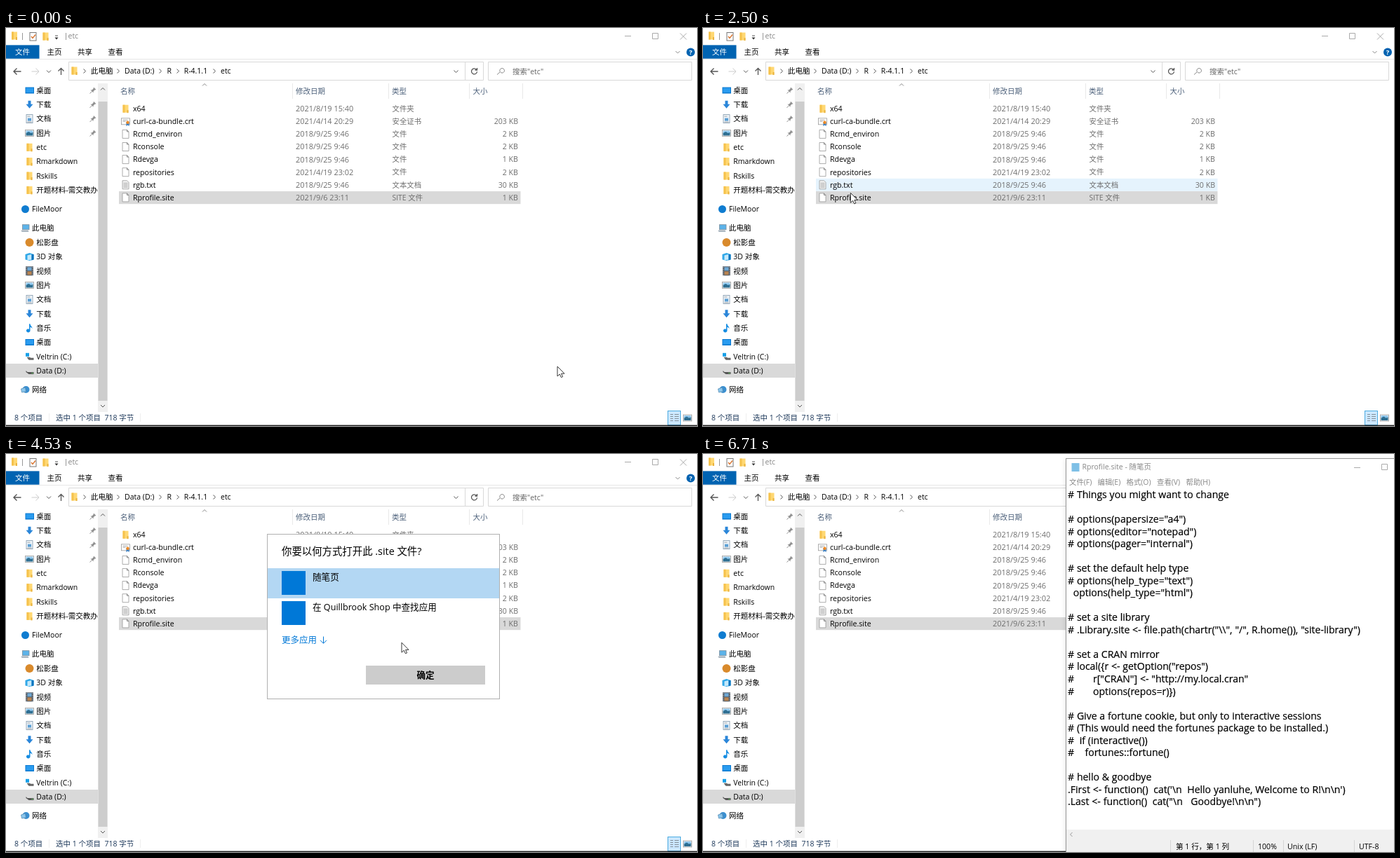
These frames come from a looping animation (985x568 px, 6.74 s). An HTML page:

```html
<!DOCTYPE html>
<html lang="zh-CN">
<head>
<meta charset="utf-8">
<title>Rprofile.site</title>
<style>
  html, body { margin: 0; width: 100%; height: 100%; overflow: hidden; background: #fff; }
  svg { display: block; width: 985px; height: 568px; }
  text { font-family: "Open Sans", "Noto Sans CJK SC", "Noto Sans CJK", sans-serif; white-space: pre; }
  .line { fill: none; stroke: #555; }
  .faint { stroke: #aaa; }
  .script { stroke: #000; stroke-width: .2px; word-spacing: .2px; }
  #explorer.active .faint { stroke: #000; }
  #explorer.active #title { fill: #000; }
  #explorer.active #selected { fill: #cce8ff; }
  #notepad.inactive .chrome { fill: #888; }
  #notepad.inactive .buttons { stroke: #aaa; }
</style>
</head>
<body>
<svg id="stage" viewBox="0 0 985 568"></svg>
<script>
const LOOP = 6740;

// Drawing helpers
const escapeText = s => s.replace(/&/g, '&amp;').replace(/</g, '&lt;');
const text = (x, cy, s, size = 10.5, fill = '#000', extra = '') =>
  `<text x="${x}" y="${cy + size * .36}" font-size="${size}" fill="${fill}" ${extra}>${escapeText(s)}</text>`;
const rect = (x, y, w, h, fill, extra = '') =>
  `<rect x="${x}" y="${y}" width="${w}" height="${h}" fill="${fill}" ${extra}/>`;
const line = (d, extra = '') => `<path class="line" d="${d}" ${extra}/>`;
const shape = (d, fill, extra = '') => `<path d="${d}" fill="${fill}" ${extra}/>`;
const at = (x, y, body) => `<g transform="translate(${x} ${y})">${body}</g>`;
const circle = (r, fill) => `<circle r="${r}" fill="${fill}"/>`;
const chevron = (x, y, dir, stroke = '#555') =>
  line({ right: `M${x - 1.5} ${y - 3}l3 3-3 3`, left: `M${x + 1.5} ${y - 3}l-3 3 3 3`,
         down: `M${x - 3} ${y - 1.5}l3 3 3-3`, up: `M${x - 3} ${y + 1.5}l3-3 3 3` }[dir],
       `style="stroke:${stroke}"`);

const icons = {
  folder: rect(-4, -5.5, 8, 11, '#ffd873') + rect(-4, -5.5, 3, 11, '#f5c24d') + rect(2, 2, 2, 4, '#e9b340'),
  page: shape('M-4.5-6H2L4.5-3.5V6H-4.5z', '#fff', 'stroke="#999" stroke-width=".8"') + line('M2-6v2.5h2.5', 'stroke-width=".7"'),
  lines: shape('M-4.5-6H2L4.5-3.5V6H-4.5z', '#f4f4f4', 'stroke="#999" stroke-width=".8"') +
    line('M-3-2.5h6M-3-.5h6M-3 1.5h6M-3 3.5h6', 'stroke-width=".8" opacity=".6"'),
  cert: rect(-6, -4.5, 12, 9, '#fff', 'stroke="#999" stroke-width=".8"') + line('M-4-2h7M-4 0h4', 'opacity=".5"') +
    shape('M1 1h4v6l-2-2-2 2z', '#2f79c2') + at(3, 1.5, circle(2.2, '#ee8a25')),
  desktop: rect(-6, -4.5, 12.5, 9, '#0a78d0') + rect(-5, -3.5, 10.5, 6.5, '#2a9cf0'),
  down: shape('M-2-5.5H2V-.5H5L0 5.5-5-.5H-2z', '#2b86d9'),
  doc: rect(-4.5, -6, 9, 12, '#eef4f9', 'stroke="#8197aa" stroke-width=".8"') + rect(-2.5, -1, 5, 4, '#5a9fd4') +
    line('M-3-3.5h4M-3 4.5h6', 'opacity=".5"'),
  picture: rect(-6, -4.5, 12, 9, '#fff', 'stroke="#999" stroke-width=".8"') + rect(-5, -3.5, 10, 4, '#8fc7ee') +
    shape('M-5 3.5V0l4-2 3 2 3-1v4.5z', '#2d6e91'),
  cube: shape('M-6-3.5L0-5.5 6-3.5V4L0 5.5-6 4z', '#31a8e8') + shape('M-3-2L3-3.5V4L-3 5z', '#c5e9fb') + shape('M3-3.5l3 0V4L3 5z', '#0a73bd'),
  video: rect(-5.5, -6.5, 11, 13, '#4b5560') + rect(-3, -5.5, 6, 5, '#6fa8d4') + rect(-3, .5, 6, 5, '#b98450') +
    line('M-4.5-5.5v12M4.5-5.5v12', 'style="stroke:#ddd" stroke-dasharray="1.3 1.3"'),
  music: shape('M-.5-6H1C1-3 4-3 4 1 3-1 2-1 1-1.5V3.5a2.8 2.5 0 1 1-1.5-2z', '#168de2'),
  disk: shape('M-5 0H4L6 2H-3z', '#ddd') + shape('M-5 0L-3 2H6V5H-1L-5 2z', '#555') + rect(3, 3, 2, 1, '#69dd69'),
  system: rect(-5.5, -5, 5, 5, '#18a0e8') + shape('M-4 1H0L2 2H6V5H-1z', '#666'),
  pc: rect(-4, -5, 9.5, 7, '#5cb3ea', 'stroke="#7b8b98" stroke-width=".8"') + shape('M-6 3H4L5 5H-5z', '#9aa8b4'),
  network: at(1, 0, circle(5, '#3b8fd0')) + shape('M-6-1L0-3 1 3-5 4z', '#8bc6ec', 'stroke="#4d84ad" stroke-width=".7"'),
  drop: circle(5.5, '#0f7cd0'),
  nut: circle(6, '#d98a2c'),
  pin: shape('M1-4.5L4.5-1 2.5-.5.5 1.5.5 3.5-3.5-.5-1.5-.5.5-2.5z', '#909090') + line('M-1.5 1.5L-4.5 4.5', 'style="stroke:#909090"')
};
const icon = (name, x, y) => at(x, y, icons[name]);

// File manager content
const navItems = [
  [89, 'desktop', '桌面'], [109.3, 'down', '下载'], [129.6, 'doc', '文档'], [150, 'picture', '图片'],
  [170.3, 'folder', 'etc'], [190.6, 'folder', 'Rmarkdown'], [211, 'folder', 'Rskills'], [231.4, 'folder', '开题材料-需交教办'],
  [258.5, 'drop', 'FileMoor', 1], [285.7, 'pc', '此电脑', 1], [306, 'nut', '松影盘'], [326.4, 'cube', '3D 对象'],
  [346.8, 'video', '视频'], [367, 'picture', '图片'], [387.4, 'doc', '文档'], [407.8, 'down', '下载'],
  [428.2, 'music', '音乐'], [448.5, 'desktop', '桌面'], [468.8, 'system', 'Veltrin (C:)'], [489, 'disk', 'Data (D:)'],
  [516, 'network', '网络', 1]
];
const files = [
  ['folder', 'x64', '2021/8/19 15:40', '文件夹', ''],
  ['cert', 'curl-ca-bundle.crt', '2021/4/14 20:29', '安全证书', '203 KB'],
  ['page', 'Rcmd_environ', '2018/9/25 9:46', '文件', '2 KB'],
  ['page', 'Rconsole', '2018/9/25 9:46', '文件', '2 KB'],
  ['page', 'Rdevga', '2018/9/25 9:46', '文件', '1 KB'],
  ['page', 'repositories', '2021/4/19 23:02', '文件', '2 KB'],
  ['lines', 'rgb.txt', '2018/9/25 9:46', '文本文档', '30 KB'],
  ['page', 'Rprofile.site', '2021/9/6 23:11', 'SITE 文件', '1 KB']
];
const rowY = i => 115.2 + 18.1 * i;

function titleBar() {
  return icon('folder', 12, 11) + line('M23.5 7v10M85.5 7v10', 'opacity=".6"') +
    rect(34, 6.5, 9, 11.5, '#fff', 'stroke="#777"') + line('M36 12l2 2.5 4-5', 'style="stroke:#d8722c" stroke-width="1.4"') +
    icon('folder', 56.5, 12) + shape('M69.5 13.5h5l-2.5 3z', '#333') + line('M70 11h4') +
    text(88.5, 11.5, 'etc', 10.5, '#888', 'id="title"') +
    `<path class="line faint" d="M882 11.5h9M921.5 7.5h8v8h-8zM961 7.5l9 9M970 7.5l-9 9"/>` +
    rect(0, 24.4, 47.5, 19.3, '#0063b1') + text(13, 34, '文件', 10.5, '#fff') +
    text(58.5, 34.3, '主页') + text(102, 34.3, '共享') + text(145.5, 34.3, '查看') +
    chevron(957.5, 34.5, 'down', '#888') + at(976, 34.5, circle(6, '#0063b1')) +
    text(976, 34.5, '?', 9.5, '#fff', 'text-anchor="middle" font-weight="700"') +
    line('M0 44.5H985', 'style="stroke:#e6e6e6"');
}
function addressBar() {
  const crumbs = [[121, '此电脑'], [169, 'Data (D:)'], [229.5, 'R'], [253.7, 'R-4.1.1'], [306, 'etc']];
  return line('M21.5 62H11.5M15.5 57.5L11 62l4.5 4.5', 'stroke-width="1.4"') +
    line('M36.5 62h10M42.5 57.5L47 62l-4.5 4.5', 'style="stroke:#ccc"') + chevron(61, 62, 'down') +
    line('M78.5 67V57.5M74.5 61.5l4-4 4 4', 'stroke-width="1.3"') +
    line('M89.5 48.5H680.5V74.5H89.5zM654.5 49v25M687.5 48.5H977.5V74.5H687.5z', 'style="stroke:#d9d9d9"') +
    icon('folder', 97.5, 61) + [112, 160, 220, 245, 297].map(x => chevron(x, 61.5, 'right')).join('') +
    crumbs.map(([x, s]) => text(x, 61.5, s)).join('') + chevron(641.5, 62, 'down') +
    line('M670.5 59.2a4 4 0 1 0 1 3M671.5 57v3h-3', 'stroke-width="1.3"') +
    line('M704 63L700 66.5M707.2 57.5a3.3 3.3 0 1 1-.1 0z', 'style="stroke:#888"') + text(722, 61.8, '搜索"etc"', 10.5, '#666');
}
function fileList() {
  const heads = [[163, '名称'], [413, '修改日期'], [550, '类型'], [665.5, '大小']];
  const grey = '#6d6d6d';
  return `<g id="headHover">${rect(149, 79, 259, 22, '#d9ebf9')}${line('M394.5 79v22', 'style="stroke:#b9d9f0"')}${chevron(400.5, 90, 'down')}</g>` +
    line('M408.5 79v22M545.5 79v22M660.5 79v22M736.5 79v22', 'style="stroke:#e9e9e9"') +
    chevron(283, 81, 'up', '#888') + heads.map(([x, s]) => text(x, 90.3, s, 10.5, '#4c607a')).join('') +
    rect(161, 0, 572.5, 18, '#e5f3fd', 'id="rowHover"') + rect(161, 233, 572.5, 18.2, '#d9d9d9', 'id="selected"') +
    files.map(([kind, name, date, type, size], i) => {
      const y = rowY(i);
      return icon(kind, 170.5, y) + text(181, y, name, 10.6) + text(413, y, date, 10.9, grey) +
        text(550.5, y, type, 10.4, grey) + text(730, y, size, 10.6, grey, 'text-anchor="end"');
    }).join('');
}
function navPane() {
  return rect(0, 0, 131, 20, '#e5f3ff', 'id="navHover"') + rect(0, 479, 131, 20, '#d9d9d9') +
    `<clipPath id="navClip"><rect x="0" y="78" width="130.5" height="470"/></clipPath><g clip-path="url(#navClip)">` +
    navItems.map(([y, kind, name, root]) => icon(kind, root ? 27.5 : 33.5, y) + text(root ? 37 : 43.3, y, name)).join('') + '</g>' +
    [0, 1, 2, 3].map(i => icon('pin', 124, navItems[i][0])).join('') +
    rect(131, 79, 14, 469, '#f0f0f0') + rect(131.5, 105, 13, 427, '#cdcdcd') +
    chevron(138, 87, 'up') + chevron(138, 539.5, 'down');
}
function statusBar() {
  const ink = '#1e395b';
  return text(12, 556.3, '8 个项目', 10.5, ink) + text(71, 556.3, '选中 1 个项目  718 字节', 10.5, ink) +
    line('M61.5 550v12M191.5 550v12', 'style="stroke:#eee"') +
    rect(943.5, 546.5, 18, 20, '#cce8ff', 'stroke="#4cabe0"') +
    line('M947 551.5h4M947 554.5h4M947 557.5h4M947 560.5h4M953 551.5h6M953 554.5h6M953 557.5h6M953 560.5h6', 'opacity=".6"') +
    icon('picture', 971.5, 556.5) + rect(0, 566.6, 985, 1.4, '#222');
}
function dialogBox() {
  return rect(372.5, 114.5, 331, 235, '#fff', 'stroke="#b0b0b0"') +
    text(393, 139.3, '你要以何方式打开此 .site 文件?', 14.4) +
    rect(373, 163, 330, 43, '#dedede', 'id="firstItem"') + rect(373, 206, 330, 43, '#dedede', 'id="secondItem"') +
    rect(393, 167, 34, 34, '#0078d7') + text(437, 175.5, '随笔页', 12.6) +
    rect(393, 210, 34, 34, '#0078d7') + text(437, 218.5, '在 Quillbrook Shop 中查找应用', 12.6) +
    text(393, 265.5, '更多应用', 12.5, '#0078d7') +
    line('M452.5 260.5v9.5M448 265.8l4.5 4.5 4.5-4.5', 'style="stroke:#0078d7"') +
    rect(513, 302, 170, 27, '#e8e8e8', 'id="okButton"') +
    text(598, 315.8, '确定', 12.6, '#8a8a8a', 'id="okLabel" text-anchor="middle" font-weight="600"');
}
const script = String.raw`# Things you might want to change

# options(papersize="a4")
# options(editor="notepad")
# options(pager="internal")

# set the default help type
# options(help_type="text")
  options(help_type="html")

# set a site library
# .Library.site <- file.path(chartr("\\", "/", R.home()), "site-library")

# set a CRAN mirror
# local({r <- getOption("repos")
#       r["CRAN"] <- "http://my.local.cran"
#       options(repos=r)})

# Give a fortune cookie, but only to interactive sessions
# (This would need the fortunes package to be installed.)
#  if (interactive())
#    fortunes::fortune()

# hello & goodbye
.First <- function()  cat('\n  Hello yanluhe, Welcome to R!\n\n')
.Last <- function()  cat("\n   Goodbye!\n\n")`;

function notepadWindow() {
  const menu = [[522, '文件(F)'], [562.5, '编辑(E)'], [603.5, '格式(O)'], [647, '查看(V)'], [688.5, '帮助(H)']];
  const status = [[674, '第 1 行，第 1 列'], [791, '100%'], [833, 'Unix (LF)'], [935, 'UTF-8']];
  const chrome = 'class="chrome"';
  return rect(517.5, 6.5, 555, 580, '#fff', 'id="frame" stroke="#999"') +
    rect(525.5, 13, 11, 12, '#7fc0e6') + text(540.5, 18.7, 'Rprofile.site - 随笔页', 10.5, '#111', chrome) +
    '<path class="line buttons" d="M928 19.5h9M967.5 14.5h8v8h-8z"/>' +
    menu.map(([x, s]) => text(x, 40, s, 10.4, '#111', chrome)).join('') +
    script.split('\n').map((s, i) => text(520, 58 + 17.53 * i, s, 14.03, '#000', 'class="script"')).join('') +
    rect(520, 49, 1, 18, '#000', 'id="caret"') +
    rect(518, 536, 480, 14, '#f0f0f0') + chevron(525, 543, 'left', '#999') +
    rect(518, 550, 480, 36, '#f0f0f0') + line('M666.5 551v20M784.5 551v20M827.5 551v20M928.5 551v20', 'style="stroke:#d5d5d5"') +
    status.map(([x, s]) => text(x, 560, s, 10.6)).join('');
}

document.getElementById('stage').innerHTML =
  `<g id="explorer">${rect(0, 0, 985, 568, '#fff')}${titleBar()}${addressBar()}${navPane()}${fileList()}${statusBar()}</g>` +
  `<g id="dialog">${dialogBox()}</g><g id="notepad">${notepadWindow()}</g>` +
  `<g id="pointer"><g id="arrow">${shape('M0 0V14L3.3 11 5.4 15.6 7.6 14.7 5.6 10.2H10z', '#fff', 'stroke="#222" stroke-width=".9"')}</g>` +
  `<circle id="ring" cx="12.7" cy="0" r="5" fill="none" stroke="#2492e0" stroke-width="2.7"/>` +
  `<path id="beam" class="line" d="M-3-7.5h2.5L0-7 .5-7.5H3M0-7V7M-3 7.5h2.5L0 7 .5 7.5H3" style="stroke:#111"/></g>`;

// Pointer path: time, x, y
const path = [
  [0, 786, 483], [20, 786, 483], [220, 670, 385], [420, 400, 225], [560, 220, 103], [680, 116, 60],
  [790, 200, 34], [900, 335, 58], [1010, 264, 102], [1120, 126, 88], [1230, 190, 36], [1340, 335, 50],
  [1450, 250, 101], [1560, 118, 84], [1670, 200, 19], [1780, 340, 55], [1890, 250, 101], [2000, 122, 88],
  [2110, 180, 60], [2280, 290, 90], [2410, 240, 190], [2500, 210.5, 235], [2570, 207, 239], [2900, 207, 239],
  [3430, 470, 292], [3650, 500, 235], [3900, 515, 182], [4130, 515, 182], [4500, 560, 262], [4780, 592, 320],
  [4940, 592, 320], [4970, 591, 317.5], [5380, 591, 317.5], [5540, 621.5, 299.5], [5780, 630, 305], [5820, 634, 309],
  [6170, 920, 590], [LOOP, 920, 590]
];
function slope(i, axis) {
  const a = path[i - 1], b = path[i], c = path[i + 1];
  if (!a || !c || a[axis] === b[axis] || b[axis] === c[axis]) return 0;
  return (c[axis] - a[axis]) / (c[0] - a[0]);
}
function pointerAt(t) {
  const i = Math.max(0, path.findIndex((p, k) => k && t < p[0]) - 1);
  const a = path[i], b = path[i + 1], span = b[0] - a[0];
  const u = Math.max(0, t - a[0]) / span, v = 1 - u;
  return [1, 2].map(k => a[k] * v * v * (1 + 2 * u) + b[k] * u * u * (3 - 2 * u) +
    span * u * v * (slope(i, k) * v - slope(i + 1, k) * u));
}

const $ = Object.fromEntries([...document.querySelectorAll('[id]')].map(e => [e.id, e]));
const show = (el, on) => el.setAttribute('visibility', on ? 'inherit' : 'hidden');
const progress = (t, start, length) => Math.min(1, Math.max(0, (t - start) / length));
const easeOut = p => 1 - (1 - p) ** 3;
function place(el, opacity, scale, x, y) {
  show(el, opacity > 0);
  el.setAttribute('opacity', opacity);
  el.setAttribute('transform', `translate(${x} ${y}) scale(${scale}) translate(${-x} ${-y})`);
}

// Highlights trail slightly behind the pointer
function hover(t) {
  const [x, y] = pointerAt(Math.max(0, t - 30));
  const free = t < 3000;
  show($.headHover, free && x > 149 && x < 408 && y > 79 && y < 103);
  const row = Math.floor((y - 106) / 18.1);
  show($.rowHover, free && x > 161 && x < 733 && row >= 0 && row < 7);
  $.rowHover.setAttribute('y', rowY(row) - 9);
  const nav = navItems.find(n => Math.abs(n[0] - y) < 10);
  show($.navHover, free && nav && x < 131);
  if (nav) $.navHover.setAttribute('y', nav[0] - 10);

  const picked = t >= 4130;
  show($.firstItem, picked || y < 206);
  $.firstItem.setAttribute('fill', picked ? '#b3d7f3' : '#dedede');
  show($.secondItem, x > 373 && y >= 206 && y < 249);
  $.okButton.setAttribute('fill', picked ? '#cccccc' : '#e8e8e8');
  $.okLabel.setAttribute('fill', picked ? '#000' : '#8a8a8a');
}

function render(t) {
  hover(t);
  $.explorer.classList.toggle('active', t >= 2750 && t < 3060);

  const dialogIn = easeOut(progress(t, 3040, 230)), dialogOut = progress(t, 5130, 140);
  place($.dialog, dialogIn * (1 - dialogOut), .9 + .1 * dialogIn - .08 * dialogOut, 538, 232);

  const opened = easeOut(progress(t, 5360, 280)), blurred = t >= 6680;
  place($.notepad, opened, .85 + .15 * opened, 795, 289);
  $.notepad.classList.toggle('inactive', blurred);
  $.frame.style.filter = `drop-shadow(0 2px ${blurred ? 3 : 5}px rgba(0,0,0,${blurred ? .15 : .28}))`;
  show($.caret, t < 5890 || (t >= 6420 && !blurred));

  const [x, y] = pointerAt(t), beam = t >= 5480;
  $.pointer.setAttribute('transform', `translate(${x} ${y})`);
  show($.beam, beam);
  show($.arrow, !beam);
  show($.ring, (t >= 2790 && t < 3060) || (t >= 5160 && !beam));
}

const start = performance.now();
function tick(now) {
  render(Math.max(0, now - start) % LOOP);
  requestAnimationFrame(tick);
}
render(0);
requestAnimationFrame(tick);
</script>
</body>
</html>
```
